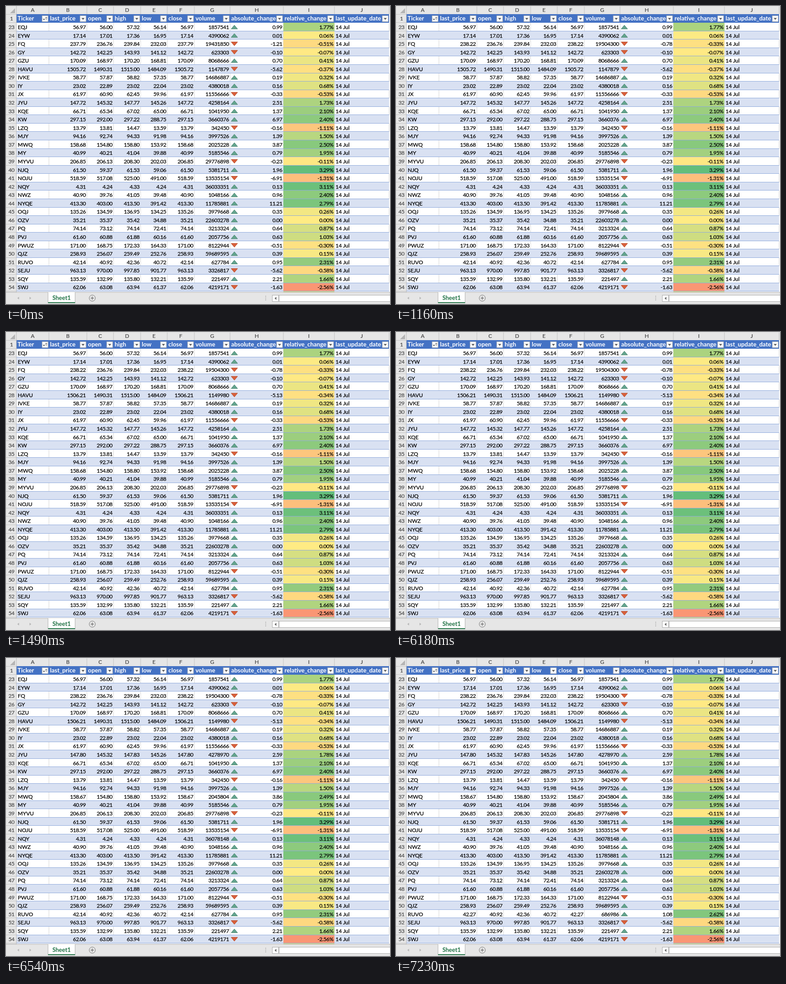
Recreate the animation shown at these times as an HTML page. Size 850 px wide and 659 px high, loop 8000 ms.

```html
<!DOCTYPE html>
<html lang="en">
<head>
<meta charset="utf-8">
<title>Stock sheet</title>
<style>
  html, body { margin: 0; width: 100%; height: 100%; overflow: hidden; background: #fff; }
  svg { display: block; }
  text { font: 12px Lato, Carlito, sans-serif; fill: #000; white-space: pre; }
  .cell { stroke: #000; stroke-width: .25px; }
  .num { letter-spacing: -.45px; text-anchor: end; }
  .head { font-size: 13.3px; font-weight: 700; fill: #fff; }
  .mid { text-anchor: middle; fill: #444; stroke: #444; stroke-width: .2px; }
  .rowno { letter-spacing: -.4px; }
  .tab { font-size: 13px; font-weight: 700; text-anchor: middle; fill: #217346; }
</style>
</head>
<body>
<svg id="sheet" width="850" height="659" viewBox="0 0 850 659"></svg>
<script>
// ticker, last, open, high, low
const prices = `EQJ 56.97 56.00 57.32 56.14
EYW 17.14 17.01 17.36 16.95
FQ 237.79 236.76 239.84 232.03
GY 142.72 142.25 143.93 141.12
GZU 170.09 168.97 170.20 168.81
HAVU 1505.72 1490.31 1515.00 1484.09
IVKE 58.77 57.87 58.82 57.35
IY 23.02 22.89 23.02 22.04
JX 61.97 60.90 62.45 59.96
JYU 147.72 145.32 147.77 145.26
KQE 66.71 65.34 67.02 65.00
KW 297.15 292.00 297.22 288.75
LZQ 13.79 13.81 14.47 13.59
MJY 94.16 92.74 94.33 91.98
MWQ 158.68 154.80 158.80 153.92
MY 40.99 40.21 41.04 39.88
MYVU 206.85 206.13 208.30 202.03
NJQ 61.50 59.37 61.53 59.06
NOJU 518.59 517.08 525.00 491.00
NQY 4.31 4.24 4.33 4.24
NWZ 40.90 39.76 41.05 39.48
NYQE 413.30 403.00 413.50 391.42
OQJ 135.26 134.59 136.95 134.25
OZV 35.21 35.37 35.42 34.88
PQ 74.14 73.12 74.14 72.41
PVJ 61.60 60.88 61.88 60.16
PWUZ 171.00 168.75 172.33 164.33
QJZ 258.93 256.07 259.49 252.76
RUVO 42.14 40.92 42.36 40.72
SEJU 963.13 970.00 997.85 901.77
SQY 135.59 132.99 135.80 132.21
SWJ 62.06 63.08 63.94 61.37`.split('\n');

// volume:change, one per row
const trades = `1857541:.99 4390062:.01 19431850:-1.21 623303:-.10 8068666:.70 1147879:-5.62
14686887:.19 4380018:.1555 11556666:-.33 4258164:2.51 1041950:1.37 3660376:6.97
342450:-.1553 3997526:1.39 2025228:3.87 5185546:.7855 29776898:-.23 5381711:1.96
13535154:-6.91 36033351:.13 1048166:.96 11785881:11.21 3979668:.35 22603278:0
3213324:.64 2057756:.63 8122944:-.51 59689595:.39 627784:.95 3326817:-5.62
221497:2.21 4219171:-1.63`.split(/\s+/);

const updates = [
  { at: 175, row: 2, last: 238.22, volume: 19504300 },
  { at: 1210, row: 5, last: 1506.21, volume: 1149980 },
  { at: 6260, row: 9, last: 147.80, volume: 4278970, high: 147.83 },
  { at: 6260, row: 14, last: 158.67, volume: 2045804 },
  { at: 6260, row: 19, last: 4.31, volume: 36078148 },
  { at: 6900, row: 28, last: 42.27, volume: 686986 }
];

const LOOP = 8000, STEP = 46, STEPS = 3;
const TOP = 37.2, H = 18.56, BASE = 13.8;
const edges = [23, 95, 179, 238, 298, 357, 417, 496, 614, 727, 848];
const titles = ['Ticker', 'last_price', 'open', 'high', 'low', 'close', 'volume',
  'absolute_change', 'relative_change', 'last_update_date'];
const sheet = document.getElementById('sheet');

function add(parent, tag, attrs, text) {
  const el = document.createElementNS('http://www.w3.org/2000/svg', tag);
  for (const k in attrs) el.setAttribute(k, attrs[k]);
  if (text !== undefined) el.textContent = text;
  parent.appendChild(el);
  return el;
}
const rect = (p, x, y, width, height, fill, more) =>
  add(p, 'rect', { x, y, width, height, fill, ...more });
const path = (p, d, fill, more) => add(p, 'path', { d, fill, ...more });
const label = (p, x, y, cls, text) => add(p, 'text', { x, y, class: cls }, text);

// yellow in the middle, green above, red below
function heat(v) {
  const mid = [255, 235, 132];
  const end = v > 0 ? [99, 190, 123] : [248, 105, 107];
  const k = Math.min(1, v > 0 ? v / 3.29 : v / -3.9);
  return `rgb(${mid.map((m, i) => Math.round(m + (end[i] - m) * k))})`;
}

const quotes = prices.map((line, i) => {
  const [name, last, open, high, low] = line.split(' ');
  const [volume, change] = trades[i].split(':');
  return { name, last: +last, open: +open, high: +high, low: +low,
    volume, before: last - change };
});

const relative = q => (q.last - q.before) / q.before * 100;
function cells(q) {
  const change = q.last - q.before;
  const plain = v => (Math.abs(v) < .001 ? 0 : v).toFixed(2);
  return [q.last, q.open, q.high, q.low, q.last].map(plain)
    .concat(String(q.volume), plain(change), plain(relative(q)) + '%');
}
const number = (box, c, y, text) => label(box, edges[c + 2] - 2.4, y, 'cell num', text);

function drawHeads() {
  rect(sheet, 0, 0, 850, 18, '#e6e6e6');
  rect(sheet, 0, 18, 23, 615, '#e6e6e6');
  path(sheet, 'M20 5V16H9Z', '#b4b4b4');
  rect(sheet, 23, 18, 825, 19, '#4472c4');
  label(sheet, 12, 32.4, 'mid rowno', '1');
  rect(sheet, 0, 18, 23, 1, '#c6c6c6');
  rect(sheet, 0, 36, 23, 1, '#c6c6c6');
  titles.forEach((title, i) => {
    const x = edges[i], r = edges[i + 1];
    label(sheet, (x + r) / 2, 13.3, 'mid', 'ABCDEFGHIJ'[i]);
    rect(sheet, r - .5, 1, 1, 17, '#c0c0c0');
    label(sheet, x + 2.5, 32.3, 'head', title);
    drawButton(r - 8.5, i === 0);
  });
}

function drawButton(cx, sorted) {
  rect(sheet, cx - 6.5, 21.5, 13, 13, '#fbfbfb', { stroke: '#b5b5b5' });
  if (sorted) {
    path(sheet, `M${cx + 2.5} 24V31M${cx + .5} 27L${cx + 2.5} 24.5L${cx + 4.5} 27`, 'none', { stroke: '#666' });
    path(sheet, `M${cx - 5} 28.5h5l-2.5 3Z`, '#555');
  } else {
    path(sheet, `M${cx - 3.5} 26.5h7l-3.5 4Z`, '#555');
  }
}

function drawRow(q, i) {
  const y = TOP + i * H, striped = i % 2;
  const top = Math.round(y), end = Math.round(y + H), tall = end - top;
  rect(sheet, 23, top, 825, tall, striped ? '#d9e1f2' : '#fff');
  if (!striped) edges.slice(1).forEach(x => rect(sheet, x - .5, top, 1, tall, '#d4d4d4'));
  const shade = rect(sheet, 614, top, 113, tall, heat(relative(q)));
  rect(sheet, 23, end - 1, 825, 1, '#8ea9db');
  rect(sheet, 0, end - 1, 23, 1, '#c6c6c6');
  label(sheet, 12, y + BASE, 'mid rowno', i + 23);

  const box = add(sheet, 'svg', { x: 0, y, width: 850, height: H });
  label(box, 26, BASE, 'cell', q.name);
  const texts = cells(q).map((s, c) => number(box, c, BASE, s));
  const up = q.last - q.before > -.001;
  path(box, up ? 'M498.4 13.6L505.5 5.2L512.6 13.6Z' : 'M498.4 5.2H512.6L505.5 13.6Z',
    up ? '#64a58e' : '#d9603b',
    { stroke: up ? '#46816d' : '#b54a2a', 'stroke-linejoin': 'round' });
  label(box, 729.5, BASE, 'cell', '14 Jul');
  return { box, texts, shade };
}

function drawFoot() {
  rect(sheet, 22.5, 0, 1, 633, '#b8b8b8');
  rect(sheet, 614, 631, 113, 2, '#e0e282');
  rect(sheet, 0, 633, 850, 26, '#e6e6e6');
  rect(sheet, 0, 632.5, 850, 1, '#ababab');
  path(sheet, 'M29 643v6l-4-3Z', '#b8b8b8');
  path(sheet, 'M52 643v6l4-3Z', '#b8b8b8');
  rect(sheet, 93, 633, 60, 23, '#fff');
  rect(sheet, 92.5, 633, 1, 23, '#ababab');
  rect(sheet, 152.5, 633, 1, 23, '#ababab');
  rect(sheet, 93, 655, 60, 2, '#217346');
  label(sheet, 123, 650, 'tab', 'Sheet1');
  add(sheet, 'circle', { cx: 191, cy: 646, r: 6.8, fill: 'none', stroke: '#777' });
  path(sheet, 'M187.5 646h7M191 642.5v7', 'none', { stroke: '#777', 'stroke-width': 1.5 });
  for (const y of [641, 645, 649]) rect(sheet, 574, y, 1.6, 1.6, '#999');
  rect(sheet, 589.5, 639.5, 14, 14, '#fff', { stroke: '#ababab' });
  path(sheet, 'M598.5 643v7l-4-3.5Z', '#666');
  rect(sheet, 604.5, 639.5, 250, 14, '#fff', { stroke: '#ababab' });
}

drawHeads();
const rows = quotes.map(drawRow);
drawFoot();

// pair each changing number with the one that rolls in from above
const rolls = updates.map(({ at, row, ...change }) => {
  const next = { ...quotes[row], ...change };
  const { box, texts, shade } = rows[row];
  const pairs = [];
  cells(next).forEach((s, c) => {
    if (s !== texts[c].textContent) pairs.push([texts[c], number(box, c, BASE - H, s)]);
  });
  return { at, pairs, shade, fills: [heat(relative(quotes[row])), heat(relative(next))] };
});

function render(t) {
  for (const { at, pairs, shade, fills } of rolls) {
    const step = Math.max(0, Math.min(STEPS, Math.floor((t - at) / STEP) + 1));
    const shift = H * step / STEPS;
    for (const [old, fresh] of pairs) {
      old.setAttribute('y', BASE + shift);
      fresh.setAttribute('y', BASE + shift - H);
      old.setAttribute('visibility', step < STEPS ? 'visible' : 'hidden');
      fresh.setAttribute('visibility', step > 0 ? 'visible' : 'hidden');
    }
    shade.setAttribute('fill', fills[step > 0 ? 1 : 0]);
  }
}

const start = performance.now();
function tick() {
  render((performance.now() - start) % LOOP);
  requestAnimationFrame(tick);
}
tick();
</script>
</body>
</html>
```
